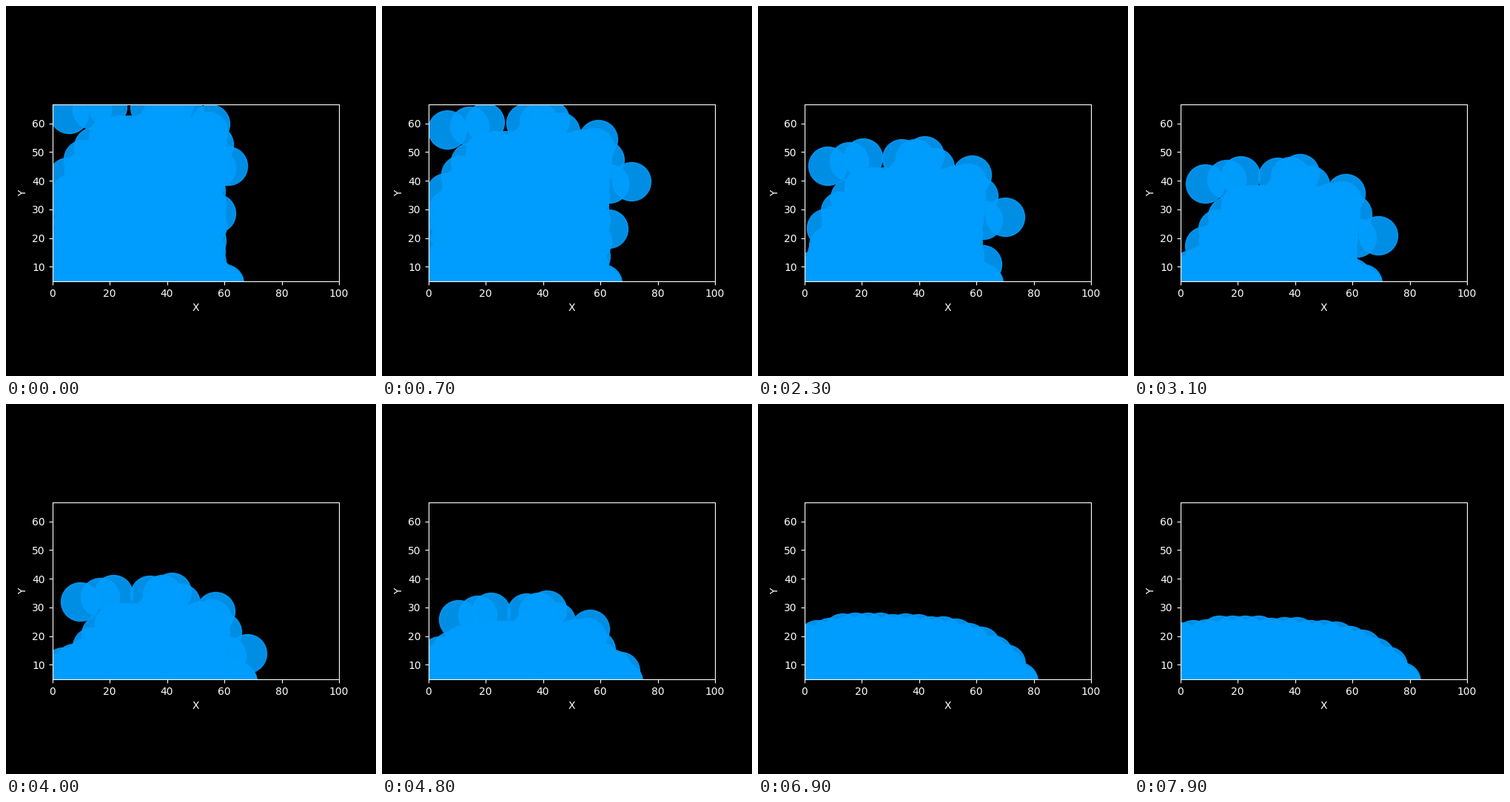
A matplotlib script for the animation above (8 s loop, 500 by 500 pixels).

```python
import numpy as np
import matplotlib.pyplot as plt
from matplotlib.animation import FuncAnimation

plt.style.use("dark_background")

FRAMES, STEP = 80, 100
FALL = 7.8             # sinking speed, units per second
T_REF = 2.3            # time at which the lump is described
LAND, FLAT = 4.0, 5.6  # landing begins, surface is level
WATER = "#009eff"

rng = np.random.default_rng(4)

# Drops standing out of the lump's edge at T_REF
LOOSE = np.array([
    (7.5, 23.5), (8, 45.3), (15.5, 46.8), (20.5, 48), (34, 47.7),
    (38.5, 47.9), (42, 48.8), (45.5, 44.7), (57, 39.3), (58.4, 42),
    (60.8, 34.7), (62.3, 26.5), (62, 10.8), (70, 27.3),
])


def make_lump():
    """Jittered grid under a flat-topped arch, at T_REF."""
    x, y = np.meshgrid(np.arange(8, 58, 4), np.arange(-14, 43, 4))
    x, y = (a.ravel() + rng.uniform(-0.7, 0.7, a.size) for a in (x, y))
    inside = y < 42 - 3.6e-5 * (x - 36) ** 4
    return np.column_stack([x, y])[inside]


LUMP = make_lump()
SPAN = np.linspace(0, 1, 18)
LEVELS = np.linspace(0, 1, 7)[:, None]
RIPPLE = rng.uniform(-0.6, 0.6, SPAN.size)


def front(t):
    return np.interp(t, [0, LAND, FLAT, 7.9], [60, 64.6, 71.6, 77])


def pool(x, t):
    """Height of the topmost pool drops at x."""
    depth = np.interp(t, [LAND, FLAT, 7.9], [13, 23, 20.2])
    wall_dip = 0.43 * np.exp(-x / 7 - max(0, t - FLAT) / 1.4)
    slope = np.sqrt(1 - np.clip(x / front(t), 0, 1) ** 4.5)
    return np.maximum(depth * (slope - wall_dip), 4.4)


def sink(drops, t):
    """Steady fall, slow drift to the middle, quick early push to the right."""
    x, y = drops.T
    x = 35 + (x - 35) * (1 - 0.035 * (t - T_REF))
    x = x - 0.5 * np.maximum(0, x - 50) * np.exp(-t / 0.3)
    return x, y - FALL * (t - T_REF)


def drops_at(t):
    px = front(t) * SPAN
    py = LEVELS * (pool(px, t) + RIPPLE)
    lx, ly = sink(LOOSE, t)
    ly = np.maximum(ly, pool(lx, t) - 1.5)
    return np.vstack([
        np.column_stack([np.tile(px, len(LEVELS)), py.ravel()]),
        np.column_stack(sink(LUMP, t)),
        np.column_stack([lx, ly]),
    ])


fig, ax = plt.subplots(figsize=(5, 5), dpi=100)
ax.set_aspect("equal")
ax.set_xlim(0, 100)
ax.set_ylim(5, 66.6)
ax.set_xticks(range(0, 101, 20))
ax.set_yticks(range(10, 61, 10))
ax.set_xlabel("X")
ax.set_ylabel("Y")
water = ax.scatter(*drops_at(0).T, s=1400, color=WATER, alpha=0.9)


def update(i):
    water.set_offsets(drops_at(i * STEP / 1000))
    return (water,)


anim = FuncAnimation(fig, update, frames=FRAMES, interval=STEP, repeat=True)
plt.show()
```
